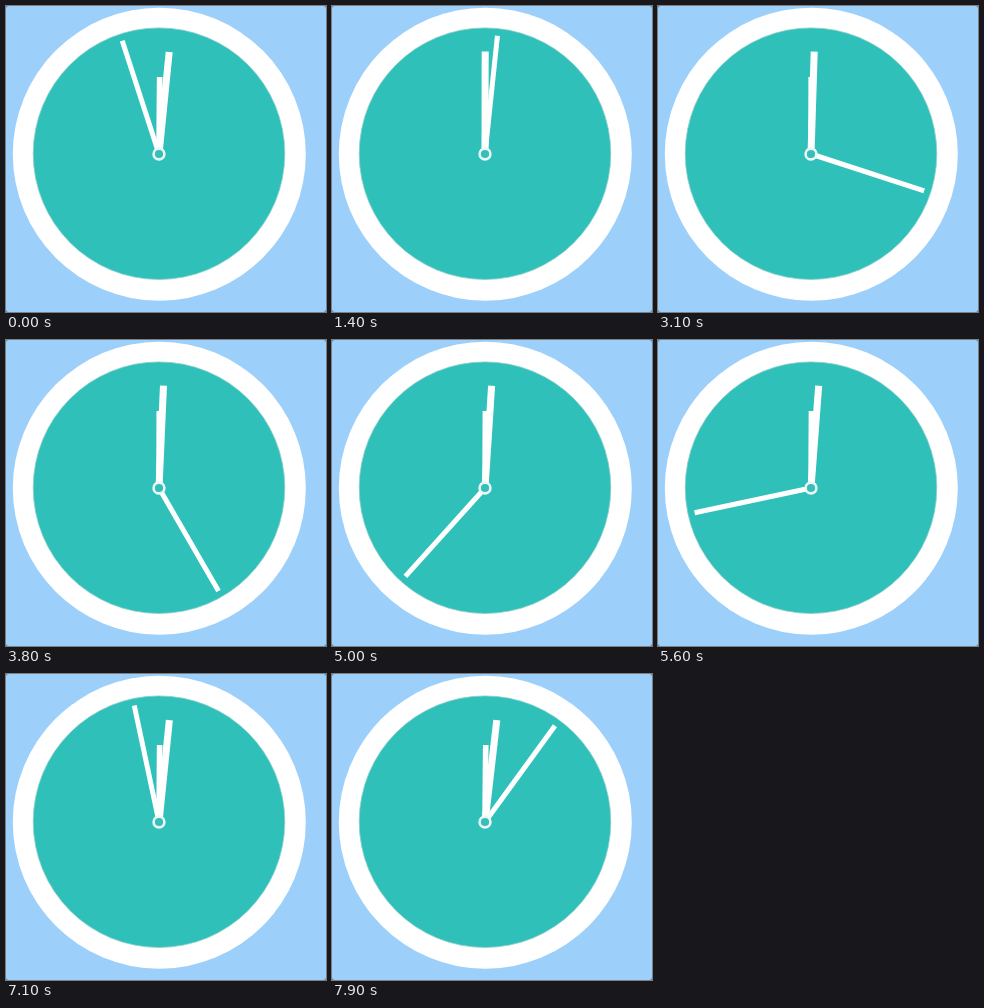
Recreate the animation shown at these times as an HTML page. Size 320 by 306 pixels, loop 8000 ms.

```html
<!DOCTYPE html>
<html lang="en">
<head>
<meta charset="utf-8">
<title>Clock</title>
<style>
  @property --angle {
    syntax: "<angle>";
    inherits: true;
    initial-value: 0deg;
  }
  html, body {
    margin: 0;
    width: 100%;
    height: 100%;
    overflow: hidden;
    background: #5b86a6;
  }
  svg {
    display: block;
    width: 320px;
    height: 306px;
    /* The 1 ms lead keeps ticks clear of rounding at step edges. */
    animation: tick 8s -1ms infinite;
  }
  .hands rect { fill: #fff; }
  .hour   { transform: rotate(calc(var(--angle) / 720)); }
  .minute { transform: rotate(calc(var(--angle) / 60)); }
  .second { transform: rotate(var(--angle)); }

  /* One 6 degree tick every 100 ms, a short hold, then a restart at twelve. */
  @keyframes tick {
    0%     { --angle: 342deg; animation-timing-function: steps(11); }
    13.75% { --angle: 408deg; animation-timing-function: step-end; }
    16.25% { --angle: 0deg;   animation-timing-function: steps(67); }
    100%   { --angle: 402deg; }
  }
</style>
</head>
<body>
<svg viewBox="0 0 320 306">
  <rect width="320" height="306" rx="3" fill="#9ccffa"/>
  <circle cx="153.3" cy="148.2" r="146.5" fill="#fff"/>
  <circle cx="153" cy="147.7" r="125.8" fill="#30c0ba" stroke="#8fcfcb" stroke-width=".8"/>
  <g class="hands" transform="translate(153 148)">
    <rect class="hour" x="-2.8" y="-77" width="5.6" height="77"/>
    <rect class="minute" x="-3.5" y="-102.5" width="7" height="102.5"/>
    <rect class="second" x="-2.5" y="-119" width="5" height="119"/>
    <circle r="5.4" fill="#38bdb8" stroke="#e9f8f7" stroke-width="2.6"/>
  </g>
</svg>
</body>
</html>
```
